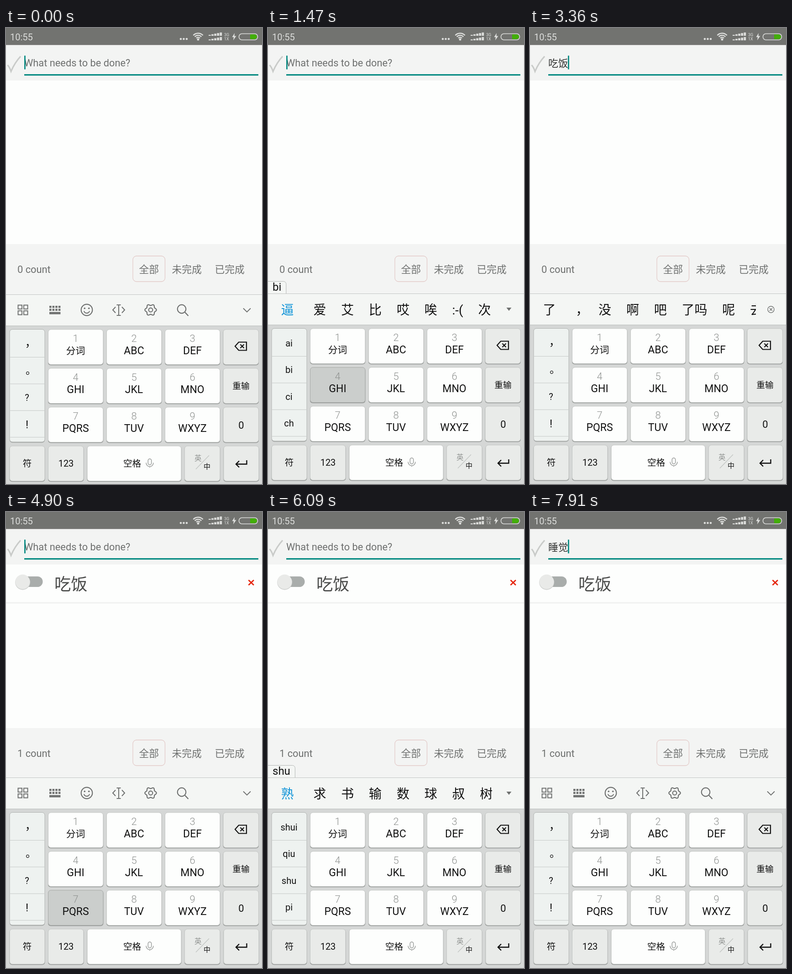
Animation, 561 px wide and 998 px high, one loop 8 s. Source, as an HTML page with a canvas:

```html
<!DOCTYPE html>
<html lang="zh-CN">
<head>
<meta charset="utf-8">
<style>
html, body { margin: 0; width: 100%; height: 100%; overflow: hidden; background: #fdfefd; }
canvas { display: block; }
</style>
</head>
<body>
<canvas id="stage" width="561" height="998"></canvas>
<script>
const g = document.getElementById('stage').getContext('2d');
const LOOP = 8000;
const FONT = 'Roboto, "Noto Sans CJK SC", sans-serif';
const PUNCT = [',', '。', '?', '!'];
const CHI = ['chi', 'ai', 'bi', 'ci'];
const SHUI = ['shui', 'qiu', 'shu', 'pi'];

// Input method states: start, pinyin, side list, candidates (none = toolbar)
const STATES = [
  [0, '', PUNCT, ''],
  [840, 'a', ['a', 'b', 'c', '2'], '啊 不 吧 从 才 把 被 草'],
  [1120, 'bi', ['ai', 'bi', 'ci', 'ch'], '逼 爱 艾 比 哎 唉 :-( 次'],
  [1540, 'chi', CHI, '吃 持 迟 池 尺 齿 翅 赤'],
  [2030, "chi'f", CHI, '吃饭 挨个 逼格 爱喝 闭合 艾和'],
  [2520, "chi'fa", CHI, '吃法 吃饭 词法 比法 持法 迟发'],
  [2800, "chi'fan", CHI, '吃饭 此番 持返 吃 次 比'],
  [3290, '', PUNCT, '了 , 没 啊 吧 了吗 呢 去'],
  [4060, '', PUNCT, ''],
  [5040, 'q', ['p', 'q', 'r', 's'], '去 人 是 请 让 起 跑 热'],
  [5390, 'qi', ['qi', 'pi', 'ri', 'sh'], '其 起 日 气 期 批 七 皮'],
  [5950, 'shu', SHUI, '熟 求 书 输 数 球 叔 树'],
  [6300, 'shui', SHUI, '睡 谁 水 税 求 书 输 数'],
  [6440, "shui'j", SHUI, '睡觉 水晶 水井 书架 水街 水军'],
  [6650, "shui'ji", SHUI, '睡觉 水晶 水机 书籍 数级 水基'],
  [6790, "shui'jia", SHUI, '睡觉 水价 谁家 水加 书架 数家'],
  [6930, "shui'jiao", SHUI, '睡觉 水饺 谁叫 睡 水 谁'],
  [7070, '', PUNCT, '了 , 吧 的 啊 了吗 呢 去'],
  [7840, '', PUNCT, '']
];

// Pressed keys: start, end, key
const PRESSES = [
  [700, 840, 2], [980, 1120, 4], [1400, 1540, 4], [1890, 2030, 3],
  [2380, 2520, 2], [2660, 2800, 6], [3920, 4060, 'enter'],
  [4900, 5040, 7], [5250, 5390, 4], [5810, 5950, 8],
  [6160, 6300, 4], [6300, 6440, 5], [6510, 6650, 4],
  [6650, 6790, 2], [6790, 6930, 6], [7700, 7840, 'enter']
];

// Moments at which the caret toggles, starting visible
const BLINKS = [70, 560, 1050, 1470, 1960, 2450, 2940, 3290, 3780, 4130,
  4340, 4480, 4970, 5460, 5950, 6440, 6930, 7070, 7560, 7910];

function rect(x, y, w, h, color) {
  g.fillStyle = color;
  g.fillRect(x, y, w, h);
}

function round(x, y, w, h, r, fill, stroke, lw = 1) {
  g.beginPath();
  g.roundRect(x, y, w, h, r);
  if (fill) { g.fillStyle = fill; g.fill(); }
  if (stroke) { g.strokeStyle = stroke; g.lineWidth = lw; g.stroke(); }
}

function text(s, x, y, size, color, align = 'left', weight = 400) {
  g.font = `${weight} ${size}px ${FONT}`;
  g.textAlign = align;
  g.fillStyle = color;
  g.fillText(s, x, y);
}

function path(d, color, lw) {
  const p = new Path2D(d);
  if (lw) { g.strokeStyle = color; g.lineWidth = lw; g.stroke(p); }
  else { g.fillStyle = color; g.fill(p); }
}

function circle(x, y, r, color, lw, from = 0, to = Math.PI * 2) {
  g.beginPath();
  g.arc(x, y, r, from, to);
  if (lw) { g.strokeStyle = color; g.lineWidth = lw; g.stroke(); }
  else { g.fillStyle = color; g.fill(); }
}

function statusBar() {
  const c = '#dcdddb';
  rect(0, 0, 561, 37.5, '#727370');
  text('10:55', 9, 27, 20, c);
  for (const x of [383, 389.5, 396]) circle(x, 24, 2.3, c);
  for (const r of [5.5, 10, 14.5]) circle(421, 26, r, c, 2.5, -Math.PI * .76, -Math.PI * .24);
  circle(421, 25, 2.5, c);
  for (let row = 0; row < 2; row++)
    for (let i = 0; i < 5; i++) {
      const h = 2 + i * 1.3;
      rect(444 + i * 6.1, 17 + row * 10 - h, 4.8, h, c);
    }
  text('3G', 478, 18, 9, c);
  text('1X', 478, 27, 9, c);
  path('M501 11L495.5 20H499L498 27L504.5 17.5H500.5Z', c);
  round(510.5, 12.5, 41, 13.5, 6.5, null, c, 1.6);
  round(535, 14, 15, 10.5, [1, 5, 5, 1], '#42ae08');
}

function inputBar(value, caret) {
  rect(0, 37.5, 561, 77.5, '#f3f4f3');
  path('M3.5 81Q8 86 11 95Q19 76 32 62', '#c9cbc9', 3.2);
  if (value) text(value, 40, 84.5, 21.8, '#333433');
  else text('What needs to be done?', 40, 84, 21.8, '#6e706f');
  rect(40, 101, 513, 3.2, '#078b82');
  if (caret) rect(value ? 83 : 40, 60.5, 2.8, 30, '#078b82');
}

function todo() {
  round(30, 141, 50.5, 23, 11.5, '#a9adab');
  circle(36.5, 154, 16.4, '#cfd1cf');
  circle(36.5, 152.7, 16, '#e9eae8');
  text('吃饭', 106, 171, 36.3, '#4a4b4a');
  path('M531.5 149L543 160M543 149L531.5 160', '#e5260c', 2.8);
  rect(0, 197, 561, 3.5, '#f2f3f2');
}

function footer(count) {
  const c = '#6e706f';
  rect(0, 473, 561, 112, '#f3f4f3');
  text(count + ' count', 25, 536, 21.8, c);
  round(278, 499, 70.5, 56, 8, null, '#e3cbc9', 1.3);
  text('全部', 291.5, 536, 21.8, c);
  text('未完成', 363.5, 536, 21.8, c);
  text('已完成', 457.5, 536, 21.8, c);
}

function toolbar() {
  const c = '#6f7170';
  for (const x of [26.5, 39]) for (const y of [604.5, 617]) round(x, y, 8.5, 8.5, 0, null, c, 2);
  for (let i = 0; i < 4; i++) for (const y of [606, 612.5]) rect(95 + i * 6.6, y, 4.6, 4.5, c);
  rect(95, 619.5, 24.4, 5, c);
  circle(177, 615, 12.3, c, 2.2);
  circle(172.3, 611.5, 1.8, c);
  circle(181.7, 611.5, 1.8, c);
  circle(177, 615.5, 6.5, c, 2, .3, Math.PI - .3);
  path('M240 608.5L234 615L240 621.5M254 608.5L260 615L254 621.5M242.5 604H251.5M242.5 627H251.5M247 604V627', c, 2);
  g.beginPath();
  for (let i = 0; i < 72; i++) {
    const a = i * Math.PI / 36, r = 11.2 + 1.5 * Math.cos(6 * a);
    g.lineTo(317 + r * Math.cos(a), 615 + r * Math.sin(a));
  }
  g.closePath();
  g.strokeStyle = c;
  g.lineWidth = 2.2;
  g.stroke();
  circle(317, 615, 4.4, c, 2.1);
  circle(385, 613, 9.3, c, 2.2);
  path('M392 620L399.5 628', c, 2.4);
  path('M520 611.5L528 619.5L536 611.5', c, 1.9);
}

function candidates(list, predicting) {
  g.save();
  g.beginPath();
  g.rect(0, 582, 495, 68);
  g.clip();
  let x = 28.5;
  list.split(' ').forEach((word, i) => {
    const first = !i && !predicting;
    text(word === ',' ? '，' : word, word === ',' ? x + 11 : x, 627, 28, first ? '#1094d8' : '#111');
    x += g.measureText(word === ',' ? '，' : word).width + (first ? 43 : 32.8);
  });
  g.restore();
  if (predicting) {
    circle(528, 616, 7, '#6f7170', 1.4);
    path('M525 613L531 619M531 613L525 619', '#6f7170', 1.4);
  } else path('M522.5 612H533.5L528 619Z', '#6f7170');
}

function pinyinTab(s) {
  g.font = `400 24px ${FONT}`;
  const w = g.measureText(s).width + 21;
  round(-2, 554.5, w + 1.5, 30, [0, 6, 0, 0], '#f4f6f4', '#b3b6b4');
  text(s, 10, 575, 24, '#111');
}

function key(x, y, w, fill, pressed) {
  round(x, y + 1.3, w, 77.5, 6, '#999c9a');
  round(x + .5, y + .3, w - 1, 76.7, 6, pressed ? '#cbcecc' : fill, pressed ? '#a5a8a6' : '#c3c6c4');
}

function sidePanel(items) {
  round(8, 658.5, 77, 247, 6, '#999c9a');
  round(8, 657.5, 77, 246.5, 6, '#eef2f0', '#b0b3b1');
  items.forEach((s, i) => {
    const y = 690 + i * 58.4;
    rect(8.5, 718 + i * 58.4, 76, 1, '#c5c9c7');
    if (s === ',') text('，', 41.5, y + 5, 25, '#111', 'left', 500);
    else if (s === '。') text(s, 43, y + 7, 23, '#111', 'left', 500);
    else text(s, 46, y + (s === '!' ? 8.5 : 7), s === '!' ? 24 : 20, '#111', 'center');
  });
}

function keyboard(state, pressed, dy) {
  const [, pinyin, side, list] = state;
  const white = '#fdfefd', grey = '#e9ebe9', ink = '#111';
  g.save();
  g.translate(0, dy);
  if (pinyin) pinyinTab(pinyin);
  rect(0, 581, 561, 1, '#c2c4c3');
  rect(0, 582, 561, 68, '#f4f6f4');
  rect(0, 649.5, 561, 349, '#d5d7d6');
  rect(0, 649.5, 561, 1, '#bcbfbd');
  if (list) candidates(list, !pinyin);
  else toolbar();
  sidePanel(side);

  ['分词', 'ABC', 'DEF', 'GHI', 'JKL', 'MNO', 'PQRS', 'TUV', 'WXYZ'].forEach((label, i) => {
    const x = 92 + i % 3 * 128, y = 657.5 + Math.floor(i / 3) * 85;
    key(x, y, 121.5, white, pressed === i + 1);
    text(i + 1, x + 60.5, y + 27.5, 22, '#8f9290', 'center', 300);
    text(label, x + 60.5, y + 54.5, i ? 23 : 20.8, ink, 'center');
  });

  for (let i = 0; i < 3; i++) key(475.5, 657.5 + i * 85, 78.5, grey);
  path('M502 694.5L510 685.5H527V703.5H510Z', ink, 2.2);
  path('M513.5 690.5L521.5 698.5M521.5 690.5L513.5 698.5', ink, 2.2);
  text('重输', 515, 787.5, 18.7, ink, 'center', 500);
  text('0', 515.5, 874.5, 22, ink, 'center');

  const y = 912.5;
  key(7.5, y, 78, grey);
  text('符', 46.5, 957.5, 19.5, ink, 'center');
  key(92, y, 78.5, grey);
  text('123', 131.5, 957.5, 20, ink, 'center');
  key(177.5, y, 207, white);
  text('空格', 276.5, 957.5, 19.6, ink, 'center', 500);
  round(311.3, 941, 7.4, 13, 3.7, null, '#9a9d9b', 1.5);
  path('M307 949.5A8 8.5 0 0 0 323 949.5M315 958V960', '#9a9d9b', 1.5);
  key(391, y, 78.5, grey);
  path('M416 963.5L445 933.5', '#c3c6c4', 1.4);
  text('英', 420.7, 944.5, 15.5, '#8f9290', 'center');
  text('中', 440.5, 963, 15, ink, 'center', 500);
  key(476.5, y, 78, grey, pressed === 'enter');
  path('M527.5 944V952.5H504M511 945.5L504 952.5L511 959.5', ink, 2.4);
  g.restore();
}

function draw(t) {
  const state = STATES.findLast(s => s[0] <= t);
  const press = PRESSES.find(p => t >= p[0] && t < p[1]);
  const caret = BLINKS.filter(b => b <= t).length % 2 === 0;
  const value = t >= 7070 ? '睡觉' : t >= 3290 && t < 4410 ? '吃饭' : '';
  const added = t >= 4480;
  const dy = t < 70 ? 2 : t < 140 ? 1 : 0;

  rect(0, 0, 561, 998, '#fdfefd');
  statusBar();
  inputBar(value, caret);
  if (added) todo();
  footer(added ? 1 : 0);
  keyboard(state, press && press[2], dy);
}

const start = performance.now();
function tick() {
  draw((performance.now() - start) % LOOP);
  requestAnimationFrame(tick);
}
tick();
</script>
</body>
</html>
```
